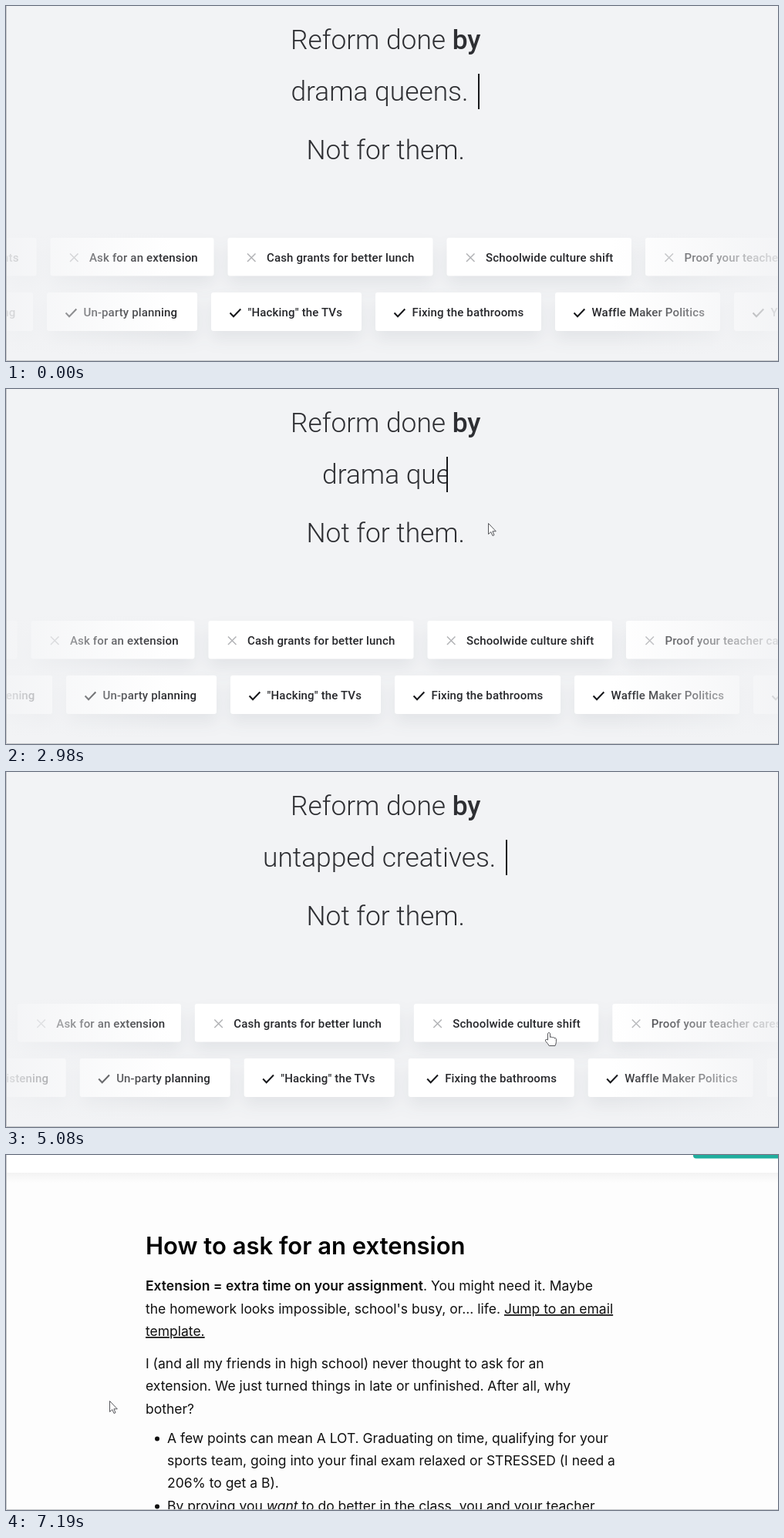
Animation of 1001 by 461 pixels, one loop 7.91 s. Source, as an HTML page:

```html
<!DOCTYPE html>
<html lang="en">
<head>
<meta charset="utf-8">
<title>Reform headline</title>
<style>
  html, body { margin: 0; width: 100%; height: 100%; overflow: hidden; background: #f2f3f5; }
  svg { display: block; width: 1001px; height: 461px; }
  text { white-space: pre; }
  .hero { font: 300 35.3px Roboto, sans-serif; fill: #2e2f33; }
  .hero .strong { font-weight: 500; }
  .row { filter: drop-shadow(0 12px 10px rgba(45, 50, 65, .07)); }
  .row text { font: 500 15px Roboto, sans-serif; letter-spacing: .15px; fill: #26272b; }
  .icon { fill: none; }
  .cross { stroke: #b2b3b6; stroke-width: 1.5; }
  .check { stroke: #17181b; stroke-width: 2; }
  .article { font: 400 17.5px Inter, sans-serif; fill: #101010; }
  .article .title { font-size: 31px; font-weight: 600; fill: #000; }
  .strong { font-weight: 600; }
  .link { text-decoration: underline; text-underline-offset: 3px; }
  .pointer path { fill: #fff; stroke: #55565a; stroke-width: 1; stroke-linejoin: round; }
</style>
</head>
<body>
<svg viewBox="0 0 1001 461" xmlns="http://www.w3.org/2000/svg">
  <defs>
    <linearGradient id="fade">
      <stop offset="0" stop-color="#f2f3f5" stop-opacity=".9"/>
      <stop offset="1" stop-color="#f2f3f5" stop-opacity="0"/>
    </linearGradient>
    <linearGradient id="headerShadow" x2="0" y2="1">
      <stop offset="0" stop-color="#f3f3f3"/>
      <stop offset="1" stop-color="#fdfdfd"/>
    </linearGradient>
    <clipPath id="reveal"><rect id="revealBox" y="80" height="60"/></clipPath>
  </defs>

  <g id="landing">
    <rect width="1001" height="461" fill="#f2f3f5"/>
    <g class="hero">
      <text x="492.3" y="56" text-anchor="middle">Reform done <tspan class="strong">by</tspan></text>
      <g clip-path="url(#reveal)"><text id="word" y="123"></text></g>
      <rect id="caret" y="88" width="2" height="46" fill="#17181b"/>
      <text x="492.3" y="199" text-anchor="middle">Not for them.</text>
    </g>
    <g id="topRow" class="row"></g>
    <g id="bottomRow" class="row"></g>
    <rect y="290" width="215" height="165" fill="url(#fade)"/>
    <rect y="290" width="215" height="165" fill="url(#fade)" transform="matrix(-1 0 0 1 1001 0)"/>
  </g>

  <g id="article" class="article">
    <rect width="1001" height="461" fill="#fdfdfd"/>
    <rect y="23" width="1001" height="13" fill="url(#headerShadow)"/>
    <rect width="1001" height="23" fill="#fff"/>
    <rect x="891" y="-20" width="130" height="24.5" rx="4" fill="#1fae9e"/>
    <text class="title" x="181" y="128.5">How to ask for an extension</text>
    <text x="181" y="176"><tspan class="strong">Extension = extra time on your assignment</tspan>. You might need it. Maybe</text>
    <text x="181" y="206">the homework looks impossible, school's busy, or... life. <tspan class="link">Jump to an email</tspan></text>
    <text x="181" y="235" class="link">template.</text>
    <text x="181" y="277">I (and all my friends in high school) never thought to ask for an</text>
    <text x="181" y="306">extension. We just turned things in late or unfinished. After all, why</text>
    <text x="181" y="336">bother?</text>
    <circle cx="196" cy="368.5" r="3"/>
    <text x="209" y="374">A few points can mean A LOT. Graduating on time, qualifying for your</text>
    <text x="209" y="403">sports team, going into your final exam relaxed or STRESSED (I need a</text>
    <text x="209" y="432">206% to get a B).</text>
    <circle cx="196" cy="456.5" r="3"/>
    <text x="209" y="462">By proving you <tspan font-style="italic">want</tspan> to do better in the class, you and your teacher</text>
  </g>

  <path d="M.5 0V460.5H1001" fill="none" stroke="#c6c8cb"/>

  <g id="pointer" class="pointer">
    <path id="arrow" d="M.5 .5V14.5L3.8 11.6 6 16.5 8 15.6 5.9 10.8H10.3Z"/>
    <path id="hand" d="M-1.5 10V1.5Q0 -.8 1.5 1.5V6.5Q3 5.2 4.3 6.8 5.8 5.8 7 7.5 9 6.7 9.4 8.8V12.5Q9.2 15 8 17.5H.2Q-1 15-4.6 11.4-4.8 9-2.8 9.2Z"/>
  </g>
</svg>
<script>
const LOOP = 7910;
const DRIFT = 8.4 / 1000;   // px per ms
const CENTER = 491.5;
const ERASE_AT = 2745, SWAP_AT = 3345, REVEAL_TIME = 600;
const ARTICLE_AT = 7000;
const POINTER_AT = 70;

const words = [
  { text: "drama queens.", width: 244 },
  { text: "untapped creatives.", width: 317 }
];

const rows = [
  {
    id: "topRow", start: -182, y: 301, height: 49.5, direction: -1, textX: 50.5,
    icon: "cross", path: "M25.5 20.5l10.5 10.5m0-10.5l-10.5 10.5",
    cards: [["Ask for appointments", 221.5], ["Ask for an extension", 212],
      ["Cash grants for better lunch", 266], ["Schoolwide culture shift", 239.5],
      ["Proof your teacher cares", 241]]
  },
  {
    id: "bottomRow", start: -145, y: 372, height: 50, direction: 1, textX: 47.5,
    icon: "check", path: "M24.5 26.5l4.5 4.8 9.3-9.8",
    cards: [["Active Listening", 180], ["Un-party planning", 195],
      ["\"Hacking\" the TVs", 195], ["Fixing the bathrooms", 215],
      ["Waffle Maker Politics", 214], ["Yearbook rescue", 185]]
  }
];

// time, x, y
const route = [
  [70, 642, 440], [300, 634, 300], [640, 625, 174], [3560, 625, 174],
  [4090, 506, 276], [4160, 512, 294], [4500, 640, 331], [4850, 704, 338],
  [5180, 704, 338], [5750, 666, 401], [6010, 666, 401],
  [6440, 150, 306], [6660, 134, 319], [LOOP, 134, 319]
];

const $ = id => document.getElementById(id);
const set = (node, attrs) => {
  for (const name in attrs) node.setAttribute(name, attrs[name]);
  return node;
};
const add = (parent, tag, attrs) =>
  parent.appendChild(set(document.createElementNS("http://www.w3.org/2000/svg", tag), attrs));
const show = (node, visible) => set(node, { visibility: visible ? "visible" : "hidden" });
const clamp = p => Math.min(1, Math.max(0, p));
const swing = p => .5 - Math.cos(Math.PI * clamp(p)) / 2;

for (const row of rows) {
  let x = row.start;
  row.spans = row.cards.map(([label, width]) => {
    const card = add($(row.id), "g", { transform: `translate(${x} ${row.y})` });
    add(card, "rect", { width, height: row.height, rx: 3, fill: "#fff" });
    add(card, "path", { class: "icon " + row.icon, d: row.path });
    add(card, "text", { x: row.textX, y: 31 }).textContent = label;
    const span = [x, x + width];
    x += width + 18;
    return span;
  });
}

// Monotone cubic through the route, resting wherever a coordinate repeats or turns.
function slope(i, axis) {
  if (i === 0 || i === route.length - 1) return 0;
  const rate = k => (route[k + 1][axis] - route[k][axis]) / (route[k + 1][0] - route[k][0]);
  const a = rate(i - 1), b = rate(i);
  return a * b > 0 ? 2 * a * b / (a + b) : 0;
}

function routeAt(t, axis) {
  const next = route.findIndex(point => point[0] > t);
  const i = Math.max(0, next - 1);
  const [from, to] = [route[i], route[i + 1]];
  const span = to[0] - from[0];
  const p = clamp((t - from[0]) / span), q = 1 - p;
  return from[axis] * (1 + 2 * p) * q * q + to[axis] * p * p * (3 - 2 * p)
    + span * p * q * (slope(i, axis) * q - slope(i + 1, axis) * p);
}

const shift = (row, t) => row.direction * DRIFT * t;

const overCard = (x, y, t) => rows.some(row =>
  y >= row.y && y <= row.y + row.height &&
  row.spans.some(([left, right]) => x >= left + shift(row, t) && x <= right + shift(row, t)));

function drawHeadline(t) {
  const swapped = t >= SWAP_AT;
  const word = words[+swapped];
  const shown = swapped
    ? swing((t - SWAP_AT) / REVEAL_TIME)
    : 1 - swing((t - ERASE_AT) / REVEAL_TIME);
  const width = 2 + (word.width - 2) * shown;
  const left = CENTER - width / 2;
  $("word").textContent = word.text;
  set($("word"), { x: left });
  set($("revealBox"), { x: left, width });
  set($("caret"), { x: Math.round(left + width - 2) });
}

function drawPointer(t, reading) {
  const x = routeAt(t, 1), y = routeAt(t, 2);
  const visible = t >= POINTER_AT;
  const pointing = !reading && overCard(x, y, t);
  set($("pointer"), { transform: `translate(${x} ${y})` });
  show($("arrow"), visible && !pointing);
  show($("hand"), visible && pointing);
}

function draw(t) {
  const reading = t >= ARTICLE_AT;
  show($("landing"), !reading);
  show($("article"), reading);
  drawHeadline(t);
  for (const row of rows) set($(row.id), { transform: `translate(${shift(row, t)} 0)` });
  drawPointer(t, reading);
}

function tick() {
  draw(performance.now() % LOOP);
  requestAnimationFrame(tick);
}
tick();
</script>
</body>
</html>
```
